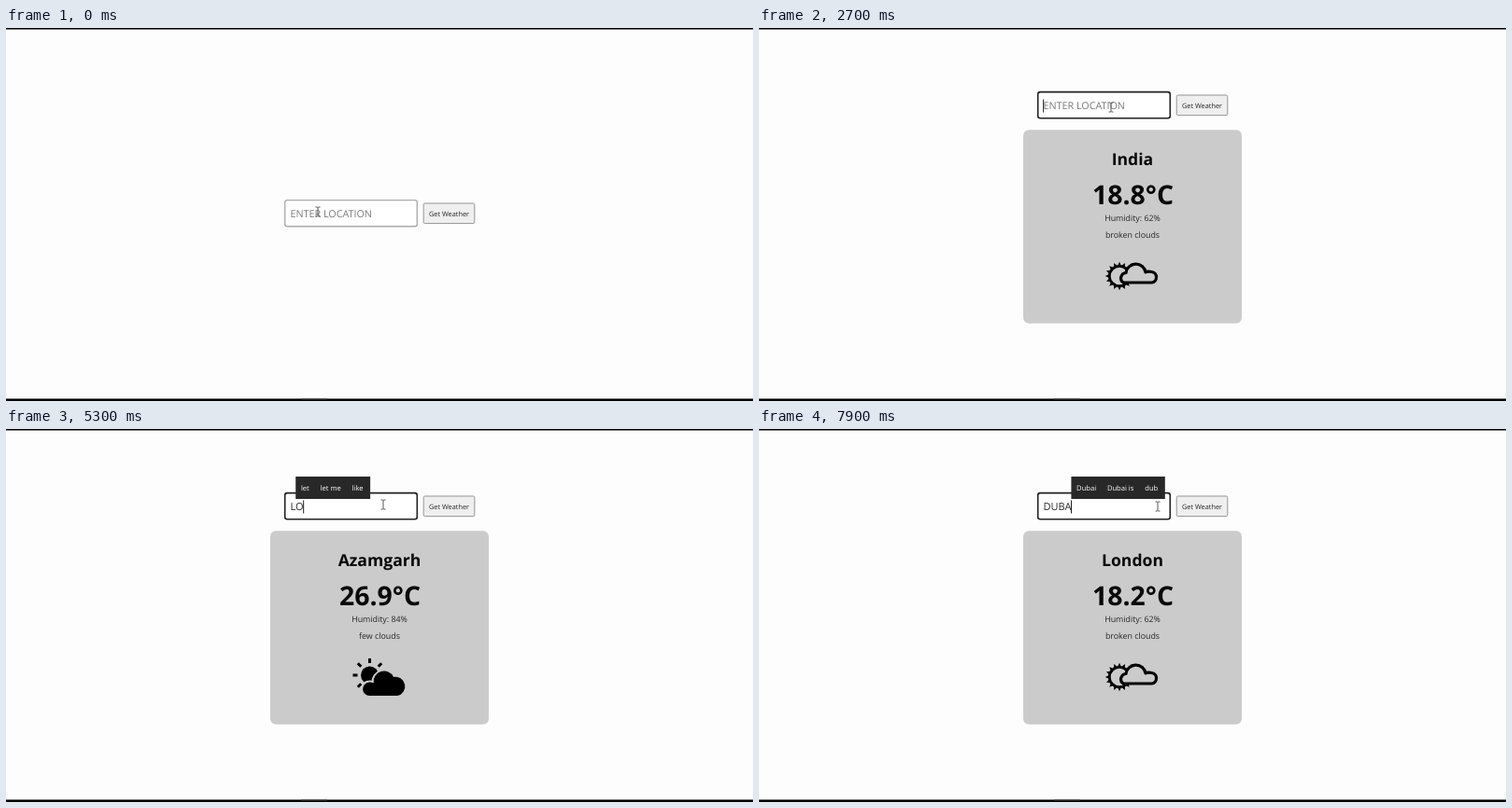
An HTML page that plays this animation: 800 px wide and 400 px high, repeating every 8 s.

```html
<!DOCTYPE html>
<html lang="en">
<head>
<meta charset="utf-8">
<title>Weather lookup</title>
<style>
  html, body { margin: 0; width: 100%; height: 100%; overflow: hidden; background: #fdfdfd; }
  svg { display: block; width: 800px; height: 400px; }
  text { font-family: "Open Sans", "Noto Sans", sans-serif; text-rendering: geometricPrecision; fill: #262626; }
  .middle { text-anchor: middle; }
  .bold { font-weight: 700; fill: #080808; }
</style>
</head>
<body>
<svg viewBox="0 0 800 400">
  <rect width="800" height="400" fill="#fdfdfd"/>
  <rect width="800" height="1.5" fill="#000"/>
  <rect y="397.5" width="800" height="2.5" fill="#000"/>
  <rect x="316" y="397.5" width="28" height="1" fill="#444"/>

  <g id="card">
    <rect x="283" y="109.3" width="234" height="207.4" rx="6" fill="#cbcbcb"/>
    <text id="city" class="middle bold" x="400" y="147" font-size="17.6"></text>
    <text id="temp" class="middle bold" x="400.5" y="189.3" font-size="28.4"></text>
    <text id="humidity" class="middle" x="400" y="206.8" font-size="8.85"></text>
    <text id="sky" class="middle" x="400" y="225" font-size="8.85"></text>

    <g id="broken">
      <circle cx="386" cy="266" r="10.7" fill="none" stroke="#000" stroke-width="2.8"/>
      <path id="teeth"/>
      <path d="M390 273a5.8 5.8 0 0 1 3-10.5a10.6 10.6 0 0 1 21-.5Q416 260.5 420.5 261.5a5.8 5.8 0 0 1 0 11.5z"
            fill="#cbcbcb" stroke="#000" stroke-width="3.2" stroke-linejoin="round"/>
    </g>

    <g id="few">
      <circle cx="389.5" cy="264" r="9.5"/>
      <path id="rays" stroke="#000" stroke-width="3"/>
      <path d="M389.5 286a7.2 7.2 0 0 1-.5-14.4q2-.2 4.6 .8a11.4 11.4 0 0 1 21.5-6.5a10.2 10.2 0 0 1 4 20.1z"
            stroke="#cbcbcb" stroke-width="4" paint-order="stroke"/>
    </g>
  </g>

  <g id="form">
    <rect id="field" x="298.7" y="68.6" width="141.6" height="28.2" rx="2.5" fill="#fff"/>
    <text id="value" x="304.5" y="87.2"></text>
    <rect id="caret" y="76.5" width="1" height="14" fill="#222"/>
    <rect id="button" x="447.2" y="72" width="54.6" height="21.6" rx="1.5"/>
    <text class="middle" x="474.5" y="85.5" font-size="7.35">Get Weather</text>
    <g id="popup">
      <rect id="popupBox" y="51" height="24" fill="#282828"/>
      <text y="66.2" font-size="7.6" style="fill:#fff"></text>
      <text y="66.2" font-size="7.6" style="fill:#fff"></text>
      <text y="66.2" font-size="7.6" style="fill:#fff"></text>
    </g>
  </g>

  <path id="beam" d="M-2.5-5h2l.5.5l.5-.5h2M0-4.5v9M-2.5 5h2l.5-.5l.5.5h2" fill="none" stroke="#555" stroke-width="1"/>
  <path id="arrow" d="M0 0v8.6l2-1.8l1.5 3.2l1.3-.6l-1.4-3.1h2.8z" fill="#fff" stroke="#666" stroke-width=".8"/>
</svg>
<script>
const $ = id => document.getElementById(id);
const LOOP = 8000, STEP = 100, TEXT_X = 304.5, FORM_SHIFT = 116;

// Each track lists [start time, value...]; the latest started entry applies.
const typing = [[0, ""]];
const type = (start, ...values) => values.forEach((v, i) => typing.push([start + i * STEP, v]));
type(400, "I", "IN", "IND", "INDI", "INDIA");
type(2300, "INDI", "IND", "IN", "I", "");
type(2900, "A", "AZ", "AZA", "AZAM", "AZAMG", "AZAMGA", "AZAMGAR", "AZAMGARH");
type(4700, "AZAMGA", "AZAM", "AZ", "A", "");
type(5200, "L", "LO", "LON", "LOND", "LONDO", "LONDON");
type(6600, "LONDO", "LOND", "LON", "LO", "L");
type(7200, "");
type(7400, "D");
type(7600, "DU", "DUB", "DUBA");

// The popup sits at the end of the text it was computed for.
const popups = [
  [0], [500, "I", "I", "in", "is"], [600, "IN", "in", "into", "in the"],
  [700, "IND", "India", "Indian", "ind"], [900],
  [3000, "A", "a", "and", "at"], [3100, "AZ", "Az", "Azure", "az"],
  [3200, "AZA", "Azar", "Azad", "azaleas"], [3300, "AZAM", "Azar", "Azad", "azaleas"], [3700],
  [5300, "L", "let", "let me", "like"], [5400, "LO", "love", "lol", "look"],
  [5500, "LON", "long", "London", "lone"], [5600, "LOND", "London", "Londo", "Lond"], [5800],
  [7600, "D", "do", "don't", "did"], [7700, "DU", "due", "dude", "during"],
  [7800, "DUB", "Dubai", "dub", "Dublin"], [7900, "DUBA", "Dubai", "Dubai is", "dub"]
];

const focus = [[0, false], [100, true], [1100, false], [2200, true], [4000, false],
               [4700, true], [6000, false], [6300, true]];

const reports = [
  [0], [1800, "India", "18.8", 62, "broken clouds"],
  [4300, "Azamgarh", "26.9", 84, "few clouds"],
  [6200, "London", "18.2", 62, "broken clouds"]
];

const pointer = [
  [0, 334, 197], [800, 334, 197], [1000, 470, 200], [1100, 484, 201], [1800, 484, 201],
  [2200, 377, 85], [3600, 377, 85], [3900, 478, 82], [4500, 478, 82], [4700, 404, 81],
  [5700, 404, 81], [5900, 478, 80], [6200, 478, 80], [6300, 427, 83], [LOOP, 427, 83]
];

const ctx = document.createElement("canvas").getContext("2d");
function measure(text, size) {
  ctx.font = `${size * 10}px "Open Sans", "Noto Sans", sans-serif`;
  return ctx.measureText(text).width / 10;
}
const textEnd = text => TEXT_X + measure(text, 11);
const current = (track, t) => track.filter(e => e[0] <= t).pop();
const show = (id, on) => $(id).setAttribute("display", on ? "inline" : "none");
function set(id, attrs) {
  for (const key in attrs) $(id).setAttribute(key, attrs[key]);
}

function pointerAt(t) {
  const i = pointer.findIndex(p => p[0] > t);
  const [t0, x0, y0] = pointer[i - 1], [t1, x1, y1] = pointer[i];
  const k = (t - t0) / (t1 - t0);
  return [x0 + (x1 - x0) * k, y0 + (y1 - y0) * k];
}

function polar(cx, cy, r, degrees) {
  const a = degrees * Math.PI / 180;
  return `${(cx + r * Math.cos(a)).toFixed(2)} ${(cy + r * Math.sin(a)).toFixed(2)}`;
}

function buildIcons() {
  let teeth = "", rays = "";
  for (let a = 0; a < 360; a += 22.5)
    teeth += `M${polar(386, 266, 11.5, a - 9)}L${polar(386, 266, 15.2, a)}L${polar(386, 266, 11.5, a + 9)}z`;
  for (const a of [135, 180, 225, 270, 315])
    rays += `M${polar(389.5, 264, 13, a)}L${polar(389.5, 264, 18, a)}`;
  set("teeth", { d: teeth });
  set("rays", { d: rays });
}

function drawPopup([, anchor, ...words]) {
  show("popup", words.length);
  if (!words.length) return;
  const left = textEnd(anchor);
  let x = left + 5.7;
  $("popup").querySelectorAll("text").forEach((node, i) => {
    node.textContent = words[i];
    node.setAttribute("x", x);
    x += measure(words[i], 7.6) + 11.8;
  });
  set("popupBox", { x: left, width: x - 4.2 - left });
}

function drawReport([, city, temp, humidity, sky]) {
  show("card", city);
  if (!city) return;
  $("city").textContent = city;
  $("temp").textContent = temp + "°C";
  $("humidity").textContent = `Humidity: ${humidity}%`;
  $("sky").textContent = sky;
  show("broken", sky === "broken clouds");
  show("few", sky === "few clouds");
}

function drawForm(t, shift, hover) {
  const text = current(typing, t)[1], focused = current(focus, t)[1];
  set("form", { transform: `translate(0 ${shift})` });
  set("field", { stroke: focused ? "#202020" : "#acacac", "stroke-width": focused ? 1.6 : 1.4 });
  $("value").textContent = text || "ENTER LOCATION";
  set("value", { "font-size": text ? 11 : 10.75 });
  $("value").style.fill = text ? "#262626" : "#777";
  show("caret", focused);
  set("caret", { x: textEnd(text) - 0.4 });
  set("button", { fill: hover ? "#e5e5e5" : "#efefef", stroke: hover ? "#7c7c7c" : "#949494" });
  drawPopup(current(popups, t));
}

function render(time) {
  const t = Math.floor(time % LOOP / STEP) * STEP;
  const report = current(reports, t);
  const shift = report[1] ? 0 : FORM_SHIFT;
  const [x, y] = pointerAt(t);
  const inRow = y > 68 + shift && y < 97 + shift;
  const overField = inRow && x > 298 && x < 441;
  const overButton = inRow && x > 447 && x < 502;

  drawReport(report);
  drawForm(t, shift, overButton);
  show("beam", overField);
  show("arrow", !overField);
  for (const id of ["beam", "arrow"]) set(id, { transform: `translate(${x} ${y})` });
}

buildIcons();
const start = performance.now();
function tick() {
  render(performance.now() - start);
  requestAnimationFrame(tick);
}
tick();
</script>
</body>
</html>
```
